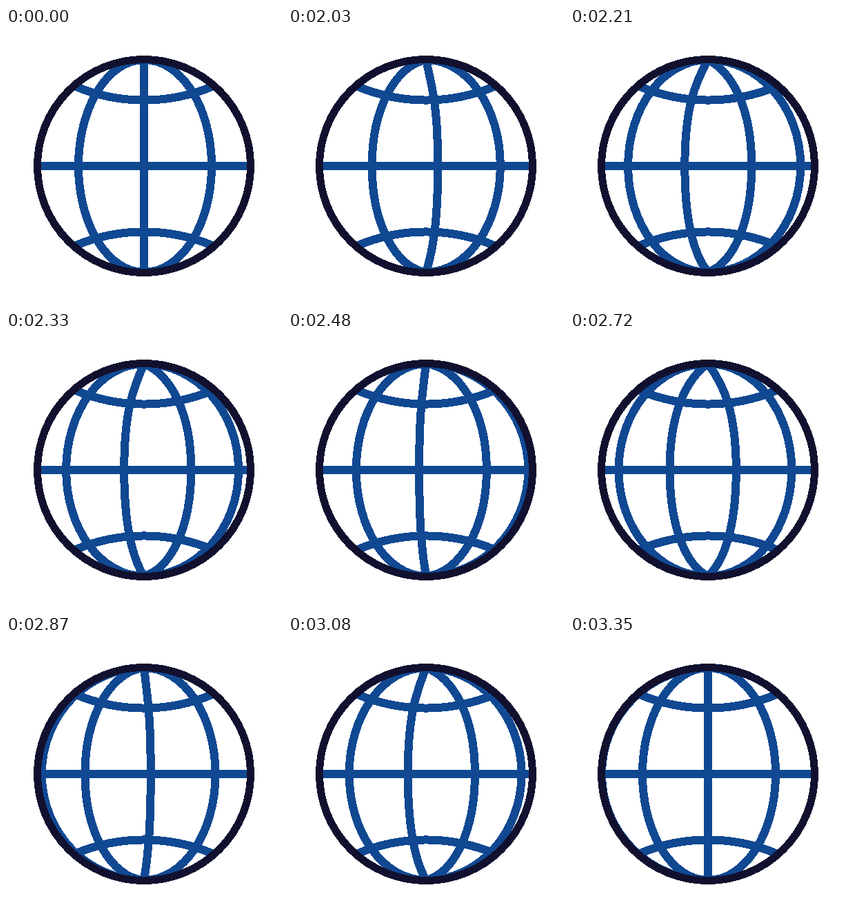
Write an HTML page that moves like this. It is 400x400 px and loops after 3.44 s.

```html
<!DOCTYPE html>
<html lang="en">
<head>
<meta charset="utf-8">
<title>Spinning globe</title>
<style>
  html, body { margin: 0; width: 100%; height: 100%; overflow: hidden; background: #fff; }
  svg { display: block; width: 100vw; height: 100vh; shape-rendering: crispEdges; }
  path, circle { fill: none; stroke: #104892; stroke-width: 12; }
  .rim { stroke: #11112f; stroke-width: 11; }
</style>
</head>
<body>
<svg viewBox="0 0 400 400">
  <path d="M46 200H354"/>
  <path d="M100 84.4A258 258 0 0 0 300 84.4M100 315.6A258 258 0 0 1 300 315.6"/>
  <g id="meridians"></g>
  <circle class="rim" cx="200" cy="200" r="154.5"/>
</svg>
<script>
const LOOP = 3440, START = 2000, STEP = 30, STEPS = 45, TURNS = 7;
const R = 154, ROUND = 0.5523;
const SLOTS = [-R, -95, 0, 98, R];
const TOP_HANDLE = 52, BOTTOM_HANDLE = 36;

const group = document.getElementById('meridians');
const lines = SLOTS.slice(1).map(() =>
  group.appendChild(document.createElementNS('http://www.w3.org/2000/svg', 'path')));

const bezier = (s, a, b) => 3 * (1 - s) ** 2 * s * a + 3 * (1 - s) * s * s * b + s ** 3;

// cubic-bezier(.167, .167, .459, 1)
function ease(t) {
  if (t <= 0 || t >= 1) return t <= 0 ? 0 : 1;
  let lo = 0, hi = 1;
  for (let i = 0; i < 30; i++) {
    const mid = (lo + hi) / 2;
    if (bezier(mid, 0.167, 0.459) < t) lo = mid; else hi = mid;
  }
  return bezier(lo, 0.167, 1);
}

// Half an ellipse bulging by x; flat tilts its pole handles towards a straight line
function meridian(x, flat) {
  const px = 200 + x, hx = 200 + x * ROUND, hy = R * ROUND;
  const top = 200 - R, bottom = 200 + R;
  return `M200 ${top}C${hx} ${top + flat * TOP_HANDLE} ${px} ${200 - hy} ${px} 200` +
    `C${px} ${200 + hy} ${hx} ${bottom - flat * BOTTOM_HANDLE} 200 ${bottom}`;
}

function draw(ms) {
  const step = Math.min(STEPS, Math.max(0, Math.floor((ms - START) / STEP)));
  const p = (TURNS * ease(step / STEPS)) % 1;
  lines.forEach((line, i) => {
    const from = SLOTS[i], to = SLOTS[i + 1];
    const flat = to === 0 ? p : from === 0 ? 1 - p : 0;
    line.setAttribute('d', meridian(from + (to - from) * p, flat));
  });
  // The entering line appears one step after the spin begins
  lines[0].style.display = step < 2 ? 'none' : '';
}

const t0 = performance.now();
function tick() {
  draw((performance.now() - t0) % LOOP);
  requestAnimationFrame(tick);
}
tick();
</script>
</body>
</html>
```
